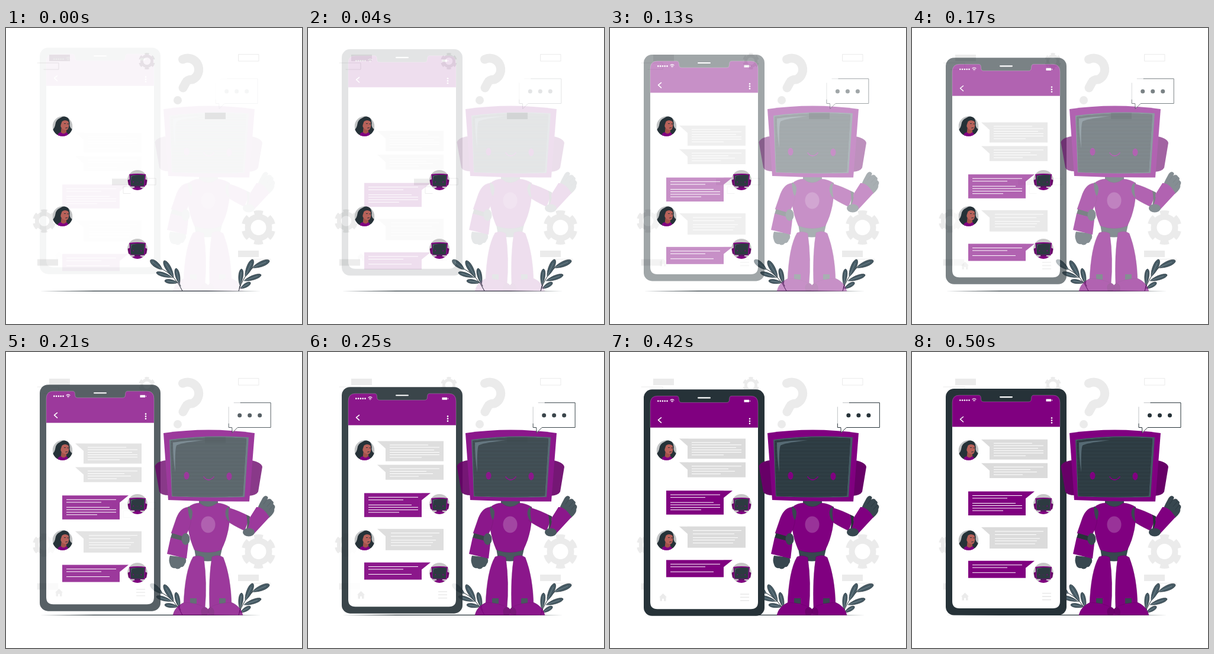
An HTML page for the animation above (0.54 s loop, 500 px wide and 500 px high).

```html
<!DOCTYPE html>
<html lang="en">
<head>
<meta charset="utf-8">
<title>Chat bot</title>
<style>
  html, body { margin: 0; width: 100%; height: 100%; overflow: hidden; background: #fff; }
  svg { display: block; width: 100vw; height: 100vh; }
  .p { fill: #800080 } .d { fill: #263238 } .s { fill: #37474f } .e { fill: #ebebeb } .w { fill: #fff }
  .line { fill: none; stroke-linecap: round; stroke-linejoin: round }
</style>
</head>
<body>
<svg viewBox="0 0 500 500">
  <defs>
    <pattern id="scan" width="8" height="2.4" patternUnits="userSpaceOnUse">
      <path d="M0 1H8" stroke="#40535c" stroke-width=".8"/>
    </pattern>
    <clipPath id="round"><circle r="17"/></clipPath>
    <g id="gear" fill="none" stroke="#ebebeb">
      <circle r="18" stroke-width="10"/>
      <circle r="25.5" stroke-width="7" pathLength="12" stroke-dasharray="1.1 .9" transform="rotate(13.5)"/>
    </g>
    <g id="woman" clip-path="url(#round)">
      <circle r="17" fill="#c2c4c5"/>
      <path class="d" d="M-4-14Q4-20 10-13Q13-9 12-2Q13 4 17 5Q17 12 9 14L-9 16Q-17 14-17 6Q-13 3-12-4Q-11-11-4-14Z"/>
      <path fill="#a3524b" d="M-2 3L-3 13Q2 17 7 12L6 5Z"/>
      <path fill="#b8625a" d="M-1-8Q4-12 10-8Q12-1 9 5Q6 8 1 5Q-4 2-3-2Z"/>
      <path class="p" d="M-9 17Q-8 11-3 10Q2 15 6 10Q10 12 10 17Z"/>
      <path class="line" d="M3-4.500l2 0M8-4l2 0M5 3l3-.5" stroke="#263238" stroke-width="1"/>
    </g>
    <g id="bot">
      <circle r="17" fill="#c7c7c7"/>
      <ellipse class="d" cy="11" rx="5" ry="2"/>
      <path class="p" d="M-9 14Q0 9 9 14Q5 17 0 17T-9 14Z"/>
      <use href="#head" transform="scale(.18) translate(-342 -192)"/>
    </g>
  </defs>

  <g id="backdrop">
    <g class="e">
      <path d="M73 45h35v11h-35zM336 143h35v11h-35zM179 254.500h35v11h-35zM392 376h35v11h-35zM53 390.500h35v11h-35z"/>
      <circle cx="290" cy="122" r="7"/>
    </g>
    <path class="line" stroke="#ebebeb" stroke-width="1"
      d="M393 44.500h34v11.500h-34zM53 59H89V70H64M214 254H253V265H240M212 268H198V279.500H210M414 390.500H447"/>
    <path class="line" stroke="#ebebeb" stroke-width="15" d="M298.500 53A18.500 18.500 0 1 1 315 87Q306 87 304 92L299 101"/>
    <use href="#gear" transform="translate(238 56) scale(.48)"/>
    <use href="#gear" transform="translate(64.500 326) scale(.68)"/>
    <use href="#gear" transform="translate(426.500 337)"/>
    <path class="d" d="M57 444.200L150 443.800H340L431 444.200L340 445H150Z"/>
  </g>
  <g id="plants"></g>

  <g id="phone">
    <rect class="d" x="57" y="62" width="204" height="382.500" rx="14"/>
    <path class="w" d="M68 126V421Q68 433 80 433H238Q250 433 250 421V126Z"/>
    <path class="p" stroke="#fff" stroke-opacity=".45" stroke-width=".5"
      d="M68 126.500V86Q68 73 80 73H113Q116.500 73 116.500 79Q116.500 84 121 84H197Q201.500 84 201.500 79Q201.500 73 205 73H238Q250 73 250 86V126.500Z"/>
    <g class="w">
      <g id="signal"></g>
      <rect x="148" y="75" width="22" height="2.200" rx="1.100"/>
      <path d="M226.500 79.500h8.500v4h-8.500zM236 80.500h1v2h-1z"/>
      <circle cx="236" cy="111.500" r="1.300"/><circle cx="236" cy="115.500" r="1.300"/><circle cx="236" cy="119.500" r="1.300"/>
    </g>
    <path class="line" stroke="#fff" stroke-width="1.100" d="M102 80Q105 77.500 108 80M103.500 82Q105 80.500 106.500 82M105 83.500v0"/>
    <path class="line" stroke="#fff" stroke-width="1.500" d="M86.500 109.500L81.500 113.500L86.500 118"/>
    <path class="e" d="M83 413L89.500 406.500L96 413H94.500V419.500H91V415.500H88V419.500H84.500V413Z"/>
    <path stroke="#ebebeb" stroke-width="1.800" d="M220 407.700h15M220 413h15M220 418.500h15"/>
  </g>

  <g id="chat"></g>

  <use href="#woman" x="95.500" y="166" />
  <use href="#woman" x="95.500" y="318" />
  <use href="#bot" x="222" y="257" />
  <use href="#bot" x="222" y="373" />

  <g id="robot">
    <path class="s" d="M326 249H358V259Q342 266 326 259Z"/>
    <path class="s" d="M318 332H365L361 350Q341 357 321 350Z"/>
    <g class="p" stroke="#5f005f" stroke-width=".4">
      <path d="M308 262Q317 255 327 255Q341 268 357 255Q369 256 378 262Q380 302 364 334Q342 343 318 334Q303 300 308 262Z"/>
      <path d="M316 346Q325 342 334 347Q340 390 336 434L300 428Q302 370 316 346Z"/>
      <path d="M348 346Q359 341 367 347Q380 380 381 428L344 434Q342 380 348 346Z"/>
      <path d="M309 262Q295 262 288 280L279 306L300 314Q312 300 313 280Z"/>
      <path d="M376 263Q393 268 412 278L403 302Q382 292 373 285Z"/>
    </g>
    <path class="s" d="M311 416h11v9h-11zM360 416h11v9h-11z"/>
    <g class="p" stroke="#5f005f" stroke-width=".4">
      <path d="M282 444.500Q285 430 301 423Q325 424 337 432Q343 437 342 444.500Z"/>
      <path d="M400 444.500Q397 430 381 423Q357 424 345 431Q338 436 339 444.500Z"/>
      <path fill="#6d006d" d="M331 444Q327 432 337 431Q343 434 342 440L339 444ZM342 442Q339 434 346 431Q353 434 351 444Z"/>
    </g>
    <path class="s" d="M311 416h11v7h-11zM360 416h11v7h-11z"/>
    <ellipse cx="341.500" cy="291.500" rx="12" ry="14" fill="#993399"/>
    <path class="s" d="M307 261Q313 262 315 270Q315 280 312 284Q308 278 307 261ZM377 261Q369 264 371 276Q373 284 378 287Q374 274 377 261Z"/>

    <path class="d" d="M280.500 306L301 312L299 320L278 314Z"/>
    <path class="s" d="M277 344L303 347Q306 354 302 358Q300 364 296 363Q291 369 286 365Q279 366 277 359Q274 352 277 344Z"/>
    <path class="p" d="M278 313.500L299 319L308 324L305 349L272 341Z"/>
    <ellipse class="s" cx="303.500" cy="316" rx="7" ry="10"/>

    <path class="d" d="M406 275L412 278Q411 290 415 299L406 300Q409 288 406 275Z"/>
    <path class="s" stroke="#263238" stroke-width=".5"
      d="M426 262Q429 255 432 250Q436 241 441 244Q444 246 440 250Q447 246 449 251Q453 253 451 257Q456 260 453 265Q454 272 444 280Z"/>
    <path class="line" stroke="#263238" stroke-width=".7" d="M440 250L435 257M448 253L441 261M451 259L445 266"/>
    <path class="p" d="M423 262Q434 261 445 279L419 307L407 300Q413 290 411 281Z"/>
    <ellipse class="s" cx="410" cy="304.500" rx="10" ry="7"/>

    <g id="head">
      <path fill="#670067" d="M270 183Q254 185 251.500 193L259 236Q262 242 275 242ZM414 183Q431 186 433 194L426 236Q423 242 410 243Z"/>
      <path class="p" d="M266 137Q342 126 420 137L411 252.500Q342 253 274 250Z"/>
      <path fill="#455a64" d="M276 148Q342 139 410 144L403 245Q342 247 280 244Z"/>
      <path id="screen" class="d" d="M278 150Q342 141 406 146L400 243Q342 246 281 243Z"/>
      <use href="#screen" style="fill:url(#scan)"/>
      <path d="M278 150Q342 141 406 146L400 243Q342 246 281 243Z" fill="url(#scan)"/>
      <path fill="#566a74" d="M282 153Q306 149 334 149Q292 154 288 158Q285 164 286 203Q282 180 282 153Z"/>
      <ellipse class="p" cx="305" cy="209" rx="4.500" ry="6.500"/>
      <ellipse class="p" cx="377" cy="210" rx="4.500" ry="6.500"/>
      <path class="line" stroke="#800080" stroke-width="1.800" d="M334 211Q342 221 351 211"/>
    </g>
  </g>

  <g id="speech">
    <path class="w" d="M383 86H454V128H398L389 137V128H383Z"/>
    <path class="line" stroke="#263238" stroke-width="1" d="M403 85.700H454V127.500H398L389 136.500L388.500 127.500H383V121"/>
    <path class="line" stroke="#263238" stroke-width=".3" d="M383 120V93M392 85.700H403"/>
    <g class="d"><circle cx="401.500" cy="107" r="3.500"/><circle cx="418.500" cy="107" r="3.500"/><circle cx="435.500" cy="107" r="3.500"/></g>
  </g>
</svg>
<script>
const el = id => document.getElementById(id);

const leaf = ([x1, y1, x2, y2, width]) => {
  const dx = x2 - x1, dy = y2 - y1, k = width / Math.hypot(dx, dy);
  const ctrl = (f, side) => `${x1 + dx * f - dy * k * side} ${y1 + dy * f + dx * k * side}`;
  const half = side => `${ctrl(.35, side)} ${ctrl(.95, side)}`;
  return `<path fill="#455a64" stroke="#263238" stroke-width=".7"
      d="M${x1} ${y1}C${half(1)} ${x2} ${y2}C${ctrl(.95, -1)} ${ctrl(.35, -1)} ${x1} ${y1}"/>
    <path stroke="#a3b0b6" stroke-width=".5" d="M${x1} ${y1}L${x1 + dx * .8} ${y1 + dy * .8}"/>`;
};
const plant = (stem, leaves) =>
  `<path class="line" stroke="#263238" stroke-width="1" d="${stem}"/>` + leaves.map(leaf).join('');

el('plants').innerHTML =
  plant('M298 444Q286 418 262 406M295 436L292 430M290 430L286 431M283 421L280 421', [
    [264, 408, 244, 392, 6], [283, 421, 267, 393, 6], [293, 432, 287, 406, 5],
    [280, 421, 254, 413, 4.5], [290, 430, 268, 427, 4.5]]) +
  plant('M393 444Q400 420 418 404M394 440L396 432', [
    [416, 405, 445, 393, 6], [404, 420, 417, 391, 6], [395, 434, 398, 407, 5],
    [402, 427, 431, 417, 5], [396, 440, 413, 430, 4.5]]);

el('signal').innerHTML = [0, 1, 2, 3, 4]
  .map(i => `<circle cx="${81.3 + i * 3.8}" cy="81.500" r="1.300"/>`).join('');

// Text rows are [offset from top, right end].
const bubble = (mine, y, height, rows, start) => {
  const [x, w, tail] = mine
    ? [95, 97, `M192 ${y}H207L192 ${y + 12}Z`]
    : [131, 98, `M131.500 ${y}H117L131.500 ${y + 13}Z`];
  return `<g fill="${mine ? '#800080' : '#dbdbdb'}">
      <rect x="${x}" y="${y}" width="${w}" height="${height}"/><path d="${tail}"/></g>
    <path stroke="#fff" stroke-width="1" d="${rows.map(([dy, end]) => `M${start} ${y + dy}H${end}`).join('')}"/>`;
};
el('chat').innerHTML =
  bubble(false, 147.7, 34, [[6.5, 203], [10.5, 222], [15, 213], [19, 222], [23, 222], [27.5, 192]], 138) +
  bubble(false, 187.7, 25.3, [[6.5, 222], [11, 200], [15, 211], [19.5, 187]], 138) +
  bubble(true, 235.5, 40.5, [[7, 186], [11.5, 161], [20, 175], [24, 186], [28.3, 186], [32.5, 154]], 102) +
  bubble(false, 296, 36, [[7, 222], [12.5, 210], [19, 216], [23, 211], [28, 208]], 140) +
  bubble(true, 352.7, 29, [[7, 186], [11.5, 161], [20, 175]], 102);

const bezier = (a, b, s) => 3 * (1 - s) ** 2 * s * a + 3 * (1 - s) * s * s * b + s ** 3;

// cubic-bezier(.36, -.01, .5, 1.38): overshoots, then settles
function ease(x) {
  if (x >= 1) return 1;
  let lo = 0, hi = 1;
  for (let i = 0; i < 24; i++) {
    const mid = (lo + hi) / 2;
    if (bezier(.36, .5, mid) < x) lo = mid; else hi = mid;
  }
  return bezier(-.01, 1.38, lo);
}

const LOOP = 540, STEP = 1000 / 24, SLIDE = 30;

function place(id, dx, dy, opacity) {
  el(id).setAttribute('transform', `translate(${dx} ${dy})`);
  el(id).setAttribute('opacity', opacity);
}

function draw(now) {
  const step = Math.floor((now % LOOP + 3.4) / STEP);
  const p = ease(.105 + .082 * step);
  const rest = SLIDE * (1 - p), opacity = Math.min(p, 1);
  place('phone', 0, -rest, opacity);
  place('chat', 0, rest, opacity);
  place('speech', -rest, 0, opacity);
  place('robot', 0, 0, opacity);
  requestAnimationFrame(() => draw(performance.now() - start));
}
const start = performance.now();
draw(0);
</script>
</body>
</html>
```
